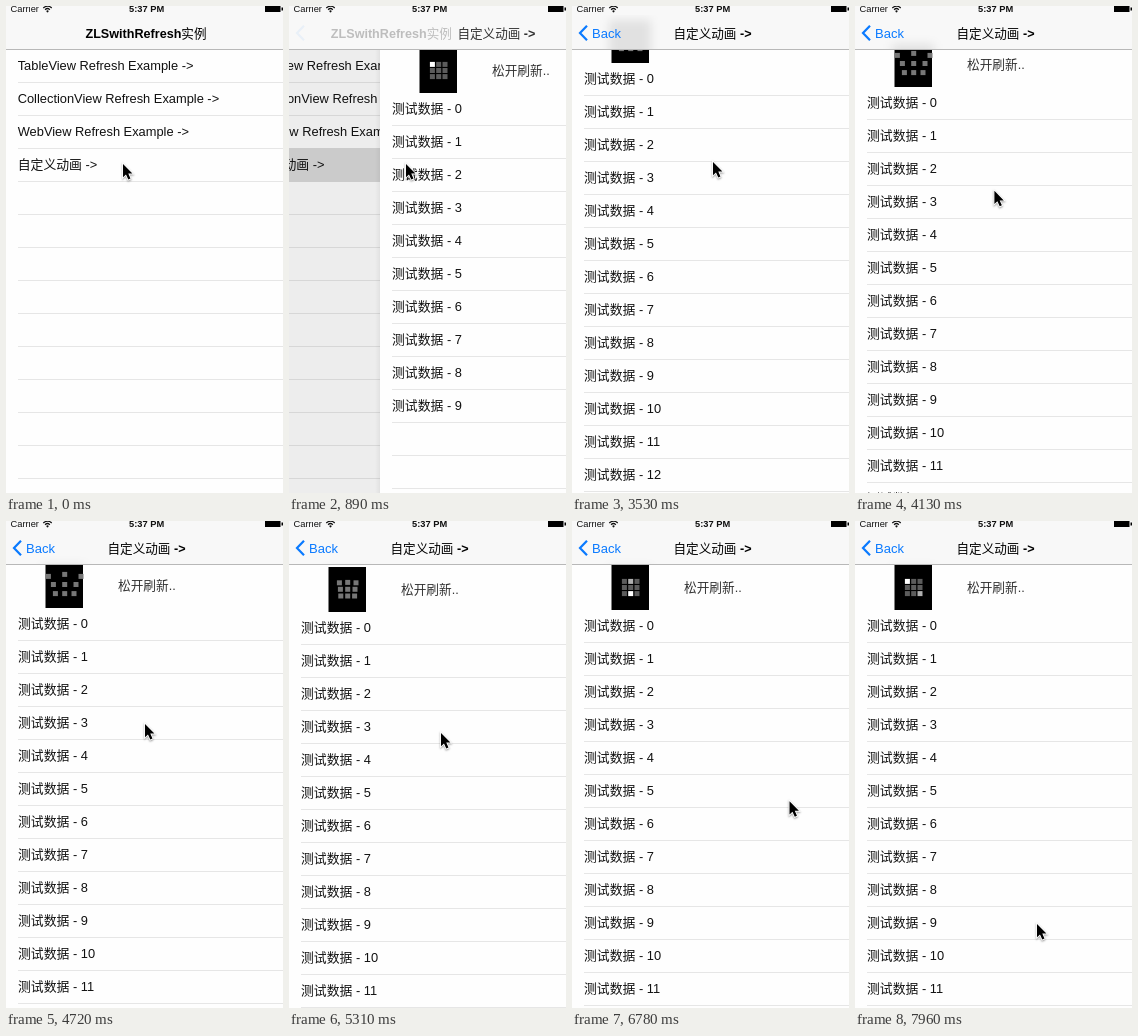
Animation of 277 by 487 pixels, one loop 8000 ms. Source, as an HTML page with a canvas:

```html
<!DOCTYPE html>
<html lang="zh">
<head>
<meta charset="utf-8">
<style>
  html, body { margin: 0; width: 100%; height: 100%; overflow: hidden; background: #fff; }
  canvas { display: block; width: 277px; height: 487px; }
</style>
</head>
<body>
<canvas id="stage"></canvas>
<script>
const W = 277, H = 487, LOOP = 8000;
const FIRST = 733, STEP = 147.14; // the picture advances in even steps
const NAV = 43, ROW = 33;
const FAMILY = '"Liberation Sans", "Noto Sans CJK SC", "Noto Sans CJK", sans-serif';
const BLUE = '#0a7aff';

const canvas = document.getElementById('stage');
const ctx = canvas.getContext('2d');
const ratio = window.devicePixelRatio || 1;
canvas.width = W * ratio;
canvas.height = H * ratio;

// Keys are [step, value, ...]
const PUSH = [[0, 0], [1, 0.672], [2, 0.95], [3, 1]];
const SCROLL = [[0, 103], [5, 103], [10, 102], [15, 102], [17, 66], [19, 73], [22, 94],
  [24, 100], [27, 103], [31, 107], [34, 110], [36, 108], [38, 105]];
const POINTER = [[12, 117, 158], [15, 124, 152], [17, 138, 132], [19, 141, 156], [24, 139, 192],
  [27, 139, 203], [31, 152, 212], [34, 180, 218], [36, 192, 214], [40, 214, 262],
  [44, 228, 335], [47, 205, 390], [49, 182, 403]];

const MENU = ['TableView Refresh Example ->', 'CollectionView Refresh Example ->',
  'WebView Refresh Example ->', '自定义动画 ->'];
const HOME_TITLE = [['ZLSwithRefresh', 700], ['实例', 500]];
const PAGE_TITLE = [['自定义动画', 500], [' ->', 700]];

const clamp = v => Math.max(0, Math.min(1, v));

function track(keys, t, i = 1) {
  if (t <= keys[0][0]) return keys[0][i];
  for (let n = 1; n < keys.length; n++) {
    const a = keys[n - 1], b = keys[n];
    if (t <= b[0]) return a[i] + (b[i] - a[i]) * (t - a[0]) / (b[0] - a[0]);
  }
  return keys[keys.length - 1][i];
}

function rect(x, y, w, h, color) {
  ctx.fillStyle = color;
  ctx.fillRect(x, y, w, h);
}

function text(str, x, y, color = '#111', size = 12.85, weight = 400) {
  ctx.font = `${weight} ${size}px ${FAMILY}`;
  ctx.fillStyle = color;
  ctx.fillText(str, x, y);
}

function separators(y) {
  for (; y < H; y += ROW) rect(12, y, W, 1, '#e6e6e6');
}

function drawMenu(selected) {
  rect(0, 0, W, H, '#fefefe');
  separators(76);
  if (selected) rect(0, 142, W, 34, '#d9d9d9');
  MENU.forEach((label, i) => text(label, 11.7, 64 + i * ROW));
}

function drawLoader(k, row) {
  const top = row - 61, cy = row - 38.5;
  rect(39.5, top, 37.5, 45, '#000');
  const spinning = k < 16 || k > 36;
  const spread = spinning ? 0 : clamp((108 - row) / 5);
  const head = Math.floor((k - 1) * 10 / 3 + 0.01);
  const tail = head - 3 - k % 2;
  const ring = [0, 1, 2, 5, 8, 7, 6, 3]; // clockwise around the grid
  for (let i = 0; i < 9; i++) {
    const c = i % 3 - 1, r = Math.floor(i / 3);
    const x = 58.7 + c * (6.3 + spread * [10, 5, 3][r]);
    const lift = [c ? -3 : -5, -1, 2][r];
    const y = cy + (r - 1) * 6.1 + spread * lift;
    let color = spread ? '#777' : '#5c5c5c';
    if (spinning && i === ring[tail % 8]) color = '#b0b0b0';
    if (spinning && i === ring[head % 8]) color = '#fff';
    rect(x - 2.5, y - 2.5, 5, 5, color);
  }
}

function drawPage(k, row) {
  rect(0, 0, W, H, '#fefefe');
  separators(row + 16);
  const count = k < 13 ? 10 : 20;
  for (let i = 0; i < count; i++) text('测试数据 - ' + i, 12, row + 4 + i * ROW);
  drawLoader(k, row);
  text('松开刷新..', 112, row - 34.5, '#333', 12.7);
  if (k >= 4 && k < 13) {
    rect(0, row + 329, W, 30, 'rgba(212,212,212,0.9)');
    text('上拉加载更多', 103, row + 348, '#333', 12.7);
  }
}

function drawTitle(parts, center, alpha) {
  const widths = parts.map(([str, weight]) => {
    ctx.font = `${weight} 12.6px ${FAMILY}`;
    return ctx.measureText(str).width;
  });
  let x = center - widths.reduce((a, b) => a + b) / 2;
  ctx.globalAlpha = alpha;
  parts.forEach(([str, weight], i) => {
    text(str, x, 31.5, '#000', 12.6, weight);
    x += widths[i];
  });
  ctx.globalAlpha = 1;
}

function drawStatus() {
  text('Carrier', 4.5, 6, '#111', 9.3);
  text('5:37 PM', 123, 6, '#111', 9.3, 700);
  ctx.strokeStyle = '#111';
  ctx.lineWidth = 1.2;
  for (const r of [3.3, 5.8]) {
    ctx.beginPath();
    ctx.arc(41.5, 6, r, -Math.PI * 0.76, -Math.PI * 0.24);
    ctx.stroke();
  }
  ctx.beginPath();
  ctx.arc(41.5, 5.3, 1.1, 0, 7);
  ctx.fill();
  rect(259, 0, 15.5, 6, '#000');
  rect(275.5, 1.5, 1.5, 3, '#000');
}

function drawNav(push, row) {
  rect(0, 0, W, NAV, '#f8f8f8');
  if (push === 1) {
    // faint blur of the loader box behind the bar
    ctx.save();
    ctx.beginPath();
    ctx.rect(0, 9, W, NAV - 9);
    ctx.clip();
    ctx.filter = 'blur(5px)';
    rect(37, row - 59, 42, 45, 'rgba(0,0,0,0.09)');
    ctx.restore();
  }
  rect(0, NAV, W, 1, '#b8b8b8');
  drawStatus();
  if (push < 1) drawTitle(HOME_TITLE, 140 - 56 * push, (1 - push) ** (push ? 1.3 : 1));
  if (push > 0) {
    drawTitle(PAGE_TITLE, 140.5 + 204 * (1 - push), clamp(push * 1.2));
    ctx.globalAlpha = clamp((push - 0.65) / 0.35);
    ctx.strokeStyle = BLUE;
    ctx.lineWidth = 2.2;
    ctx.beginPath();
    ctx.moveTo(15, 19.7);
    ctx.lineTo(8, 27);
    ctx.lineTo(15, 34.3);
    ctx.stroke();
    ctx.globalAlpha = clamp((push - 0.85) / 0.15);
    text('Back', 20, 31.5, BLUE, 13);
    ctx.globalAlpha = 1;
  }
}

function drawPointer(x, y) {
  ctx.save();
  ctx.translate(x, y);
  ctx.scale(0.88, 0.88);
  ctx.beginPath();
  [[0, 0], [0, 15], [3.4, 11.8], [6, 17.6], [8.5, 16.5], [6, 10.9], [10.7, 10.9]]
    .forEach(p => ctx.lineTo(...p));
  ctx.closePath();
  ctx.shadowColor = 'rgba(0,0,0,0.4)';
  ctx.shadowBlur = 2 * ratio;
  ctx.shadowOffsetY = ratio;
  ctx.strokeStyle = '#fff';
  ctx.lineWidth = 2;
  ctx.stroke();
  ctx.shadowColor = 'transparent';
  ctx.fillStyle = '#000';
  ctx.fill();
  ctx.restore();
}

function draw(ms) {
  const k = Math.floor((ms - FIRST) / STEP);
  const push = track(PUSH, k);
  const row = Math.round(track(SCROLL, k));
  const left = Math.round(W * (1 - push));
  ctx.setTransform(ratio, 0, 0, ratio, 0, 0);

  if (push < 1) {
    ctx.save();
    ctx.translate(-0.3 * W * push, 0);
    drawMenu(k >= 0);
    ctx.restore();
    rect(0, 0, left, H, `rgba(0,0,0,${0.1 * push})`);
  }
  if (push > 0) {
    if (push < 1) {
      const shade = ctx.createLinearGradient(left - 5, 0, left, 0);
      shade.addColorStop(0, 'rgba(0,0,0,0)');
      shade.addColorStop(1, 'rgba(0,0,0,0.05)');
      rect(left - 5, 0, 5, H, shade);
    }
    ctx.save();
    ctx.translate(left, 0);
    drawPage(k, row);
    ctx.restore();
  }
  drawNav(push, row);
  drawPointer(track(POINTER, k), track(POINTER, k, 2));
}

const start = performance.now();
function tick() {
  draw((performance.now() - start) % LOOP);
  requestAnimationFrame(tick);
}
tick();
</script>
</body>
</html>
```
